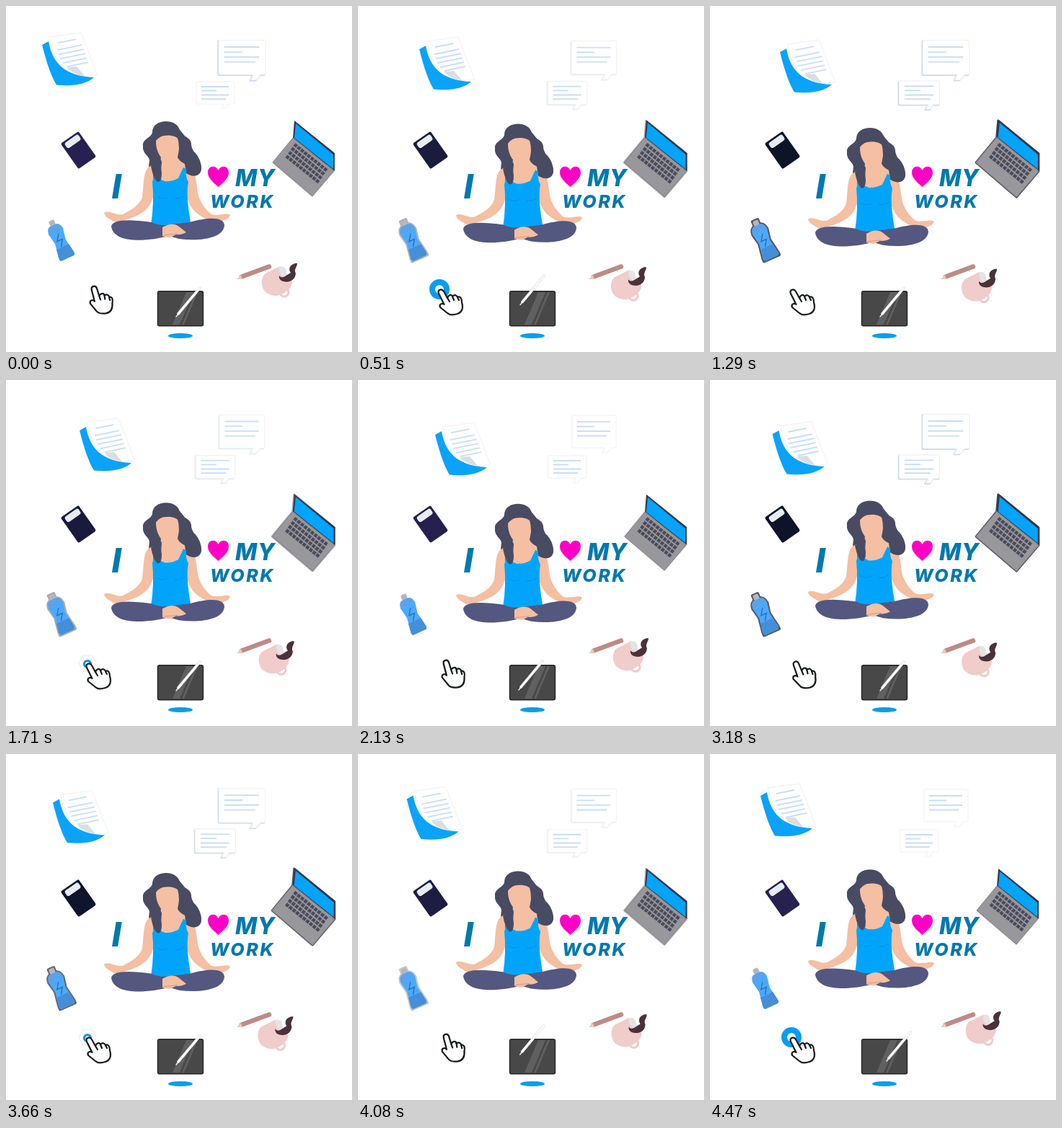
An HTML page that plays this animation: 480 by 480 pixels, repeating every 4.5 s.

```html
<!DOCTYPE html>
<html lang="en">
<head>
<meta charset="utf-8">
<title>I love my work</title>
<style>
  html, body { margin: 0; height: 100%; overflow: hidden; background: #fff; }
  svg { display: block; width: 100vw; height: 100vh; }
  text { font: italic 800 25px Inter, "Open Sans", sans-serif; fill: #0079ae; }
  .line { fill: none; stroke: #c8def5; stroke-width: 1.8; }
  .faint { fill: #fff; stroke: #f1f1f3; }
  .edge { fill: #fff; stroke: #c6d8ea; stroke-width: 2; }
  .skin { fill: #f4bfa2; }
  .pop { transform-box: fill-box; transform-origin: center; }
</style>
</head>
<body>
<svg viewBox="0 0 480 480">
  <defs>
    <path id="bigShape" d="M298 49H356Q358 49 358 51V92Q358 94 356 94H352L346 101H339L342 94H298Q297 94 297 92V51Q297 49 298 49Z"/>
    <path id="smallShape" d="M265 105H315Q317 105 317 107V134Q317 136 315 136H309L305 142H299L302 136H266Q264 136 264 134V106Z"/>
  </defs>

  <g id="paper">
    <path class="faint" d="M60 43 104 37 127 96 80 100Z"/>
    <path fill="#0aa3f9" d="M50 54 59 49C64 78 80 97 122 99Q106 113 70 109.500Q60 94 50 54Z"/>
    <path fill="#dcdde0" d="M84 85 98 84 109 97Q94 96 84 85Z"/>
    <path class="line" d="M72 51 97 46M71 61 105 54M73 67 108 60M75 73 110 66M79 79 112 72M85 84 114 78"/>
  </g>

  <g id="bigBubble" class="pop">
    <use href="#bigShape" class="edge" x="-.8" y=".8"/>
    <use href="#bigShape" class="faint"/>
    <path class="line" d="M304 58H350M304 64.500H328M304 71H350M304 77.500H345"/>
  </g>
  <g id="smallBubble" class="pop">
    <use href="#smallShape" class="edge" x="-.8" y=".8"/>
    <use href="#smallShape" class="faint"/>
    <path class="line" d="M271 112H309M271 117.500H292M271 123.500H309M271 129H305"/>
  </g>

  <g transform="translate(100.5 200) rotate(-35)">
    <rect x="-15" y="-21.500" width="30" height="43" rx="2" fill="#262150"/>
    <rect class="glow" x="-15" y="-21.500" width="30" height="43" rx="2" fill="#0b1326"/>
    <rect x="-11" y="-19" width="23" height="9" rx="3" fill="#e6edf0"/>
  </g>

  <g id="laptop" class="pop" stroke-linejoin="round">
    <path class="glow" fill="none" stroke="#3a3850" stroke-width="3" d="M400 160 455 205V229L425 264 370 217 398 183Z"/>
    <path fill="#343748" d="M400 159 456 204V229L398 184Z"/>
    <path fill="#03a4fb" d="M402 163 454 206V226L400 183Z"/>
    <path fill="#98979b" stroke="#88878c" d="M398 183 455 229 425 264 370 217Z"/>
    <g id="keys" fill="none" stroke="#4a4b5c" stroke-width="4.600" stroke-dasharray="4.6 1.3"></g>
  </g>

  <g transform="translate(75 326) rotate(-24)">
    <g class="glow" fill="#4a4d5c" stroke="#4a4d5c" stroke-width="4" stroke-linejoin="round">
      <path d="M-4-31H4V-24Q10-23 11-14L8 1 11.500 22V26H-11.500V22L-8 1-11-14Q-10-23-4-24Z"/>
    </g>
    <rect x="-4" y="-31" width="8" height="8" rx="2" fill="#b9b4bc"/>
    <path fill="#5aa3ea" d="M-11-14Q-10-24-4-24H4Q10-24 11-14Z"/>
    <path fill="#4ba9fd" d="M-11-15H11L8 1 11.500 22Q11.500 26 9 26H-9Q-11.500 26-11.500 22L-8 1Z"/>
    <path fill="#458fd8" d="M-9.500 9H9.500L11.500 22Q11.500 26 9 26H-9Q-11.500 26-11.500 22Z"/>
    <path fill="none" stroke="#2f6fb0" stroke-width="1.400" d="M2-10-4-1H4L-2 8"/>
  </g>

  <text x="146.500" y="267" style="font-size:47px">I</text>
  <text x="318" y="250" style="font-size:32px;letter-spacing:.5px">MY</text>
  <text x="283" y="280" style="letter-spacing:2.600px">WORK</text>
  <path fill="#fd00c6" d="M294.500 251C288 245 280 239 280 231C280 221 291 220 294.500 228C298 220 309 221 309 231C309 239 301 245 294.500 251Z"/>

  <g id="woman">
    <path fill="#494b62" d="M203 175C203 156 238 155 241 173C243 181 256 181 257 191C257 203 270 209 271 224C271 236 259 238 250 233L215 240C200 245 197 232 199 214C198 207 189 205 190 194C189 184 202 183 203 175Z"/>
    <path class="skin" d="M208 187C207 179 237 175 240 187C241 197 239 205 238 210Q241 217 253 221V250H203V222Q214 219 215 210C210 203 208 196 208 187Z"/>
    <path fill="#494b62" d="M206 190Q210 183 218 179.500Q230 176 238 182Q240 190 240 198L253 223 256 190 238 168 208 170ZM200 205 211 204 216 216 214 241Q209 247 205 242L198 226Z"/>
    <path class="skin" d="M204 221C190 223 192 241 189 265C186 275 176 282 162 289C152 291 142 282 136 287C137 293 144 295 149 299Q157 302 165 297C188 290 203 281 205 258Z"/>
    <path class="skin" d="M250 221C265 225 263 245 267 263C270 273 277 283 285 289C297 292 305 286 311 290C309 296 303 297 298 299Q290 301 282 297C265 291 252 279 250 258Z"/>
    <path fill="#494b62" d="M245 200 262 203Q271 213 271 226C270 237 259 238 250 232Z"/>
    <path fill="#00a5fb" d="M203 226 207 224L214 240Q217 242 220 243Q229 244 239 239L246 224 250 226Q249 238 253 244Q249 263 257 305H201Q206 270 203 244Q207 236 203 226Z"/>
    <path fill="#494b62" d="M201 222 214 216 216 232Q216 244 211 244Q205 242 201 222Z"/>
    <path fill="none" stroke="#078ad8" d="M209 264Q217 269 224 265M234 267Q242 268 248 263"/>
    <path fill="#54577f" d="M146 306C147 297 166 295 202 300Q214 306 230 303L255 300C280 293 302 292 303 304C302 322 270 327 240 323L226 319C195 327 150 330 146 306Z"/>
    <path class="skin" d="M217 307Q231 299 240 306L250 314Q242 318 236 317L228 321Q221 321 217 319Z"/>
    <path fill="none" stroke="#d59b83" d="M218 318 238 316"/>
  </g>

  <path stroke="#bd8b87" stroke-width="6.500" stroke-linecap="round" d="M327 375.500 365 361.500"/>
  <path fill="#edc9b4" d="M320 379 326 373 328 379Z"/>
  <g id="mug">
    <circle cx="386" cy="397" r="6" fill="none" stroke="#efcac9" stroke-width="3"/>
    <path fill="#f0cccb" d="M380 361 360 371C352 377 354 393 362 398Q371 404 380 401C392 396 397 390 397 381Z"/>
    <path fill="#e2e4e6" d="M379 362Q387 359 389 368L390 378Q378 374 379 362Z"/>
    <path fill="#4b3139" d="M379 374C383 380 389 373 395 370C390 363 397 356 404 357C404 362 399 365 402 371C401 382 390 385 382 381Q378 378 379 374Z"/>
  </g>

  <g id="ripple">
    <circle id="wave" cx="113" cy="393" r="13" fill="#079df2"/>
    <circle id="gap" cx="113" cy="393" r="12" fill="#fff"/>
    <g id="echo" fill="none">
      <path stroke="#e3eaf0" d="M107 382H119L125 393 119 404H107L101 393Z"/>
      <circle cx="113" cy="394" r="4.500" stroke="#0792e4" stroke-width="3.200"/>
    </g>
  </g>
  <g id="hand" fill="#fff" stroke="#14191b" stroke-width="2.200" stroke-linecap="round" stroke-linejoin="round">
    <path d="M119.500 414 112 399C110 394 116 391 119 396L124 405C126 400 130 400 131 403C134 400 137 401 138 404C142 402 144 406 144 411C147 421 143 425 138 427C132 429 127 429 124 426L114 418C112 413 117 412 119.500 414Z"/>
    <path fill="none" d="M124 405 127 410M131 403 133 408M138 404 140 408"/>
  </g>

  <rect x="210.500" y="395.800" width="63" height="48" rx="2.500" fill="#484848" stroke="#252525" stroke-width="1.400"/>
  <path fill="#606060" d="M231 442 250 397H260L241 442ZM244 442 263 397H266L247 442Z"/>
  <ellipse cx="242" cy="457.500" rx="17" ry="3.600" fill="#059eed"/>
  <g id="pen" stroke-linecap="round">
    <path stroke="#d9dadd" stroke-width="3.800" d="M239 427 269 391"/>
    <path stroke="#fafafa" stroke-width="2.800" d="M239 427 269 391"/>
    <path stroke="#eee" stroke-width="1.500" d="M236 431 240 426"/>
  </g>
</svg>
<script>
  const LOOP = 4500, PULSE = 2250, CLICK = 990, STROKE = 1800;
  const $ = id => document.getElementById(id);
  const all = name => document.querySelectorAll(name);
  const clamp = v => Math.min(1, Math.max(0, v));
  const ramp = (t, from, to) => clamp((t - from) / (to - from));
  const move = (id, x, y, rest = '') => $(id).setAttribute('transform', `translate(${x} ${y}) ${rest}`);

  // Each key is [time, x, y].
  const paperPath = [[0, 0, 0], [255, 21, 3.5], [510, 35, 6], [1290, 47, 10], [2130, 57, 22],
    [2670, 59.5, 29], [3660, 15, 13.5], [4470, 20, 4], [4500, 20, 4]];
  const bobPath = [[0, 0, 0], [510, 0, 3.5], [1290, 0, 8.8], [2130, 0, 11.7],
    [2670, 0, 10], [3660, 0, 4.8], [4500, 0, 0]];
  const penPath = [[0, 0, 0], [90, 0, 0], [330, -13, -1], [510, -11, -16.5],
    [870, 9, -5], [1290, 0, 0], [1800, 0, 0]];

  function along(path, t) {
    const i = Math.max(1, path.findIndex(key => key[0] >= t));
    const [t0, x0, y0] = path[i - 1], [t1, x1, y1] = path[i];
    const k = ramp(t, t0, t1);
    return [x0 + (x1 - x0) * k, y0 + (y1 - y0) * k];
  }

  $('keys').innerHTML = [0, 1, 2, 3].map(row =>
    `<path d="M${400 - row * 3.7} ${192 + row * 5.4}l46 37"/>`).join('');

  function draw(t) {
    const swing = Math.abs(Math.sin(Math.PI * t / PULSE));
    const glow = swing * swing;
    const bigGlow = Math.max(glow, 1 - t / 500);
    move('paper', ...along(paperPath, t));
    move('woman', ...along(bobPath, t));
    move('pen', ...along(penPath, t % STROKE));
    move('mug', -6 * swing, 8 * swing);
    all('.glow').forEach(el => el.style.opacity = glow);

    $('laptop').style.transform = `scale(${1 + 0.02 * swing})`;
    for (const [id, level] of [['bigBubble', bigGlow], ['smallBubble', glow]]) {
      $(id).style.transform = `scale(${1 + 0.06 * level})`;
      $(id).querySelector('.edge').style.opacity = level;
    }

    const c = t % CLICK;
    const lift = 1 - ramp(c, 150, 300) + ramp(c, 800, 960);
    move('hand', 3 * lift, -2 * lift, `rotate(${12 * lift} 130 415)`);
    $('ripple').style.opacity = ramp(c, 390, 430) - ramp(c, 740, 820);
    $('wave').setAttribute('r', 4 + 10 * ramp(c, 390, 500));
    $('gap').setAttribute('r', 6 + 9 * ramp(c, 520, 670));
    $('echo').style.opacity = ramp(c, 540, 660);
  }

  function frame() {
    draw(performance.now() % LOOP);
    requestAnimationFrame(frame);
  }
  frame();
</script>
</body>
</html>
```
